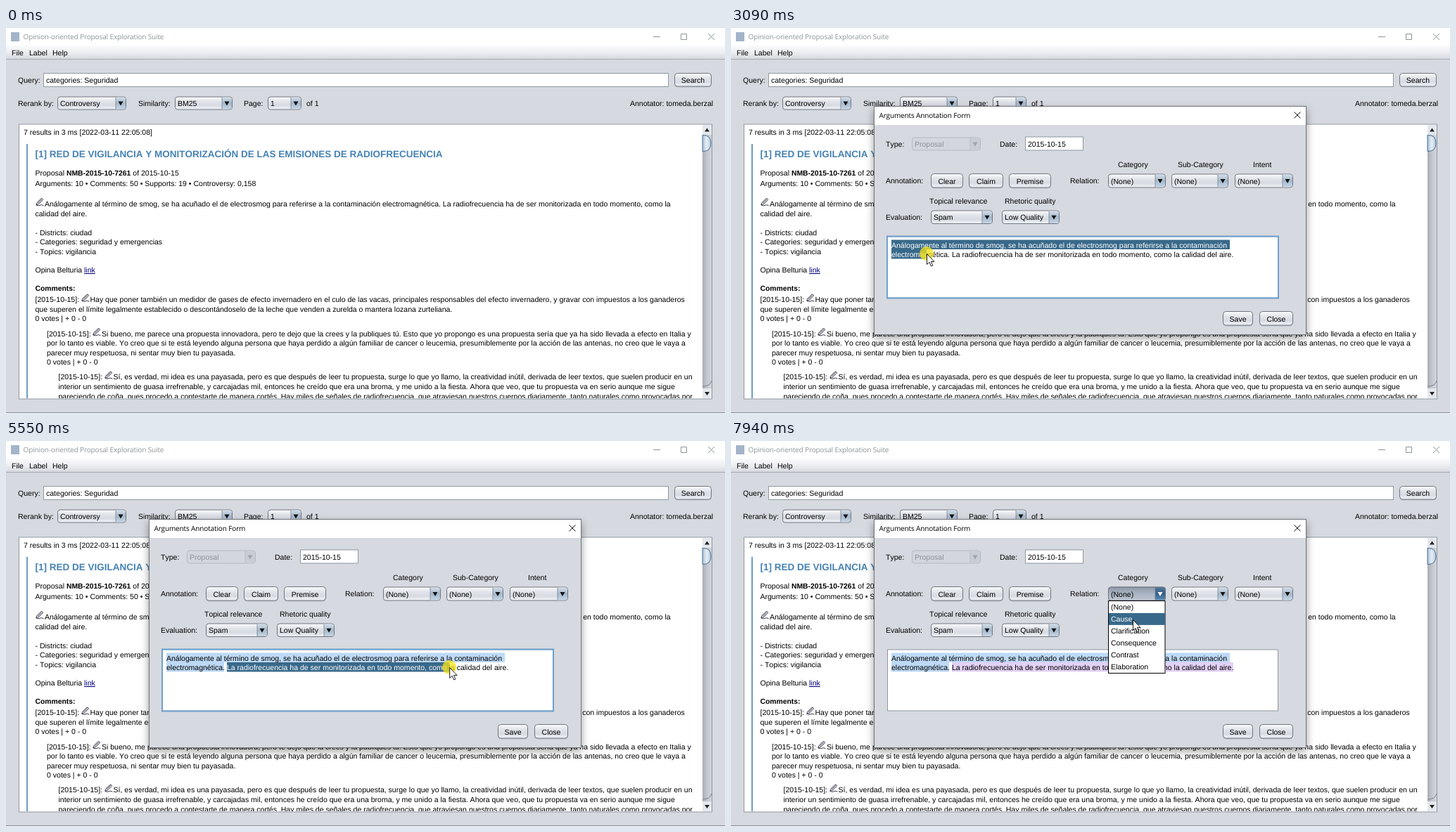
An HTML page for the animation above (8000 ms loop, 1022 by 548 pixels).

```html
<!DOCTYPE html>
<html lang="es">
<head>
<meta charset="utf-8">
<title>Annotation demo</title>
<style>
html, body { margin: 0; width: 100%; height: 100%; overflow: hidden; background: #d6d9df; }
svg { display: block; }
text { font: 10.52px "Liberation Sans", Arial, sans-serif; font-kerning: none; text-rendering: geometricPrecision; fill: #000; }
.bold { font-weight: bold; font-size: 10.35px; }
.head { font-weight: bold; font-size: 13.5px; fill: #4682b4; }
.win { font: 10px "Open Sans", "Noto Sans", sans-serif; letter-spacing: -.13px; }
.link { fill: #000080; text-decoration: underline; }
.off { fill: #8e9196; }
.inv { fill: #fff; }
.mid { text-anchor: middle; }
</style>
</head>
<body>
<svg id="stage" width="1022" height="548" viewBox="0 0 1022 548"></svg>
<script>
const LOOP = 8000;
const pct = ms => +(ms / LOOP * 100).toFixed(4) + '%';

// Visible spans in ms: from, to, from, to ...
const spans = {
  active: [1040, 1220],
  dialog: [1220, LOOP],
  dateFocus: [1220, 2770],
  areaFocus: [2770, 4170, 5280, 6840],
  clearHover: [1640, 1680],
  spamHover: [1730, 1790],
  claimHover: [4060, 4390],
  claimPress: [4170, 4260],
  claimFocus: [4170, 5280],
  premiseHover: [6440, 7230],
  premisePress: [6840, 6900],
  premiseFocus: [6840, 7560],
  pickA: [2770, 4260],
  pickB: [5280, 6900],
  markA: [4260, LOOP],
  markB: [6900, LOOP],
  list: [7560, LOOP],
  rowNone: [7560, 7870],
  rowCause: [7870, LOOP],
  glow: [1040, 1220, 2770, 3330, 4170, 4260, 5280, 5920, 6840, 6900, 7560, 7620],
  arrow: [40, 890, 1220, LOOP],
  hand: [890, 1220]
};

// Pointer stops: ms, x, y, easing towards the next stop
const path = [
  [0, 915, 527], [40, 915, 527, 'cubic-bezier(.35,.1,.4,1)'], [830, 50, 257], [860, 50, 256], [980, 50, 250],
  [1530, 50, 250, 'ease-in'], [1660, 300, 224], [1740, 304, 262], [1800, 282, 267],
  [1830, 282, 267, 'ease-out'], [2310, 237, 310], [2400, 237, 310], [2620, 231, 310],
  [2770, 231, 310], [3090, 278, 321], [3120, 278, 321], [3330, 311, 325],
  [3760, 311, 325, 'ease-in-out'], [4080, 356, 222], [4350, 356, 222], [4540, 351, 269, 'ease-out'],
  [4840, 317, 327], [4910, 316, 327], [5090, 315, 326], [5280, 315, 326, 'ease-in-out'],
  [5670, 706, 321], [5860, 706, 321], [5920, 718, 321], [6160, 718, 321, 'ease-in-out'],
  [6530, 452, 217], [7210, 452, 217, 'ease-in-out'], [7500, 577, 218], [7660, 577, 218, 'ease-in-out'],
  [7940, 571, 254], [LOOP, 571, 254]
];

// Selection widths: ms, px, easing
const widths = {
  growA1: [[0, 0], [2770, 0], [2929, 26], [2930, 481], [LOOP, 481]],
  growA2: [[0, 0], [2929, 0], [2930, 26], [3090, 50], [3120, 50], [3330, 82], [LOOP, 82]],
  growB: [[0, 0], [5280, 0, 'ease-in-out'], [5670, 392], [5860, 392], [5920, 400], [LOOP, 400]]
};

function buildCss() {
  let css = '';
  const rule = (name, body, ease) =>
    css += `@keyframes ${name}{${body}}.${name}{animation:${name} ${LOOP}ms ${ease} infinite}\n`;
  for (const [name, times] of Object.entries(spans)) {
    const steps = times.map((ms, i) => `${pct(ms)}{visibility:${i % 2 ? 'hidden' : 'visible'}}`);
    rule(name, '0%{visibility:hidden}' + steps.join(''), 'step-end');
  }
  const key = (ms, prop, ease = 'linear') => `${pct(ms)}{${prop};animation-timing-function:${ease}}`;
  for (const [name, keys] of Object.entries(widths))
    rule(name, keys.map(([ms, w, ease]) => key(ms, `width:${w}px`, ease)).join(''), 'linear');
  rule('pointer', path.map(([ms, x, y, ease]) => key(ms, `transform:translate(${x}px,${y}px)`, ease)).join(''), 'linear');
  return css;
}

const text = (x, y, s, cls = '') => `<text x="${x}" y="${y}" class="${cls}">${s}</text>`;
const rect = (x, y, w, h, fill, more = '') => `<rect x="${x}" y="${y}" width="${w}" height="${h}" fill="${fill}" ${more}/>`;
const line = (d, color, w = 1) => `<path d="${d}" fill="none" stroke="${color}" stroke-width="${w}"/>`;
const group = (cls, ...parts) => `<g class="${cls}">${parts.join('')}</g>`;
const grad = (id, stops, horizontal) =>
  `<linearGradient id="${id}" x2="${horizontal ? 1 : 0}" y2="${horizontal ? 0 : 1}">` +
  stops.map((c, i) => `<stop offset="${i / (stops.length - 1)}" stop-color="${c}"/>`).join('') + '</linearGradient>';
const ring = (x, y, w, h, cls, r = 0) =>
  rect(x - .5, y - .5, w + 1, h + 1, 'none', `rx="${r}" stroke="#6fa1cf" stroke-width="2" class="${cls}"`);
const field = (x, y, w, h) => rect(x + .5, y + .5, w - 1, h - 1, '#fff', 'stroke="#9197a2"');

function button(x, y, w, h, label, id) {
  const box = (fill, cls = '') => rect(x + .5, y + .5, w - 1, h - 1.5, fill, `rx="4" stroke="#70757f" class="${cls}"`);
  let out = rect(x + .5, y + 1.5, w - 1, h - 1, '#b9bdc6', 'rx="4"') + box('url(#face)');
  if (id) out += box('url(#lit)', id + 'Hover');
  if (id && id !== 'clear') out += box('url(#down)', id + 'Press') + ring(x, y, w, h - .5, id + 'Focus', 4.5);
  return out + text(x + w / 2, y + h / 2 + 4, label, 'mid');
}

function combo(x, y, w, h, label, look = '') {
  const off = look === 'off', open = look === 'open', ax = x + w - 15;
  const edge = off ? '#b4b8c0' : '#70757f';
  const face = off ? '#d3d6dc' : open ? 'url(#down)' : look === 'lit' ? 'url(#lit)' : 'url(#face)';
  const tip = off ? '#c9cdd5' : open ? 'url(#deep)' : 'url(#blue)';
  const ay = y + h / 2 - 2.5;
  return rect(x + .5, y + .5, w - 1, h - 1, face, `rx="3.5" stroke="${edge}"`) +
    `<path d="M${ax} ${y + 1}H${x + w - 4}q3 0 3 3V${y + h - 4}q0 3-3 3H${ax}Z" fill="${tip}"/>` +
    line(`M${ax} ${y + 1}v${h - 2}`, edge, .7) +
    `<path d="M${ax + 3.5} ${ay}h7l-3.5 6z" fill="${off ? '#9fa4ad' : open ? '#fff' : '#111'}"/>` +
    text(x + 4, y + h / 2 + 4, label, off ? 'off' : '');
}

const pen = (x, y) => `<g transform="translate(${x} ${y})">` +
  line('M.8 9.8L1.8 6.7L8 .8Q10 .2 10.5 2.6L4.2 8.8ZM3 7.6L8.6 2.2M.8 9.8Q4 11.8 6.2 10.3T11.5 10.8', '#1d1d33', .9) + '</g>';

const cross = (x, y, color) => line(`M${x} ${y}l9 9m0-9l-9 9`, color);

const titleBar = color => rect(0, 0, 1022, 25, '#fff') + rect(7, 6, 12, 13, '#a3b4ca') +
  `<text x="24.5" y="16" class="win" style="fill:${color}">Opinion-oriented Proposal Exploration Suite</text>` +
  line('M920 12.5h10M959.5 8.5h8v8h-8z', color) + cross(998, 8, color);

function results() {
  return [
    text(25, 152, '7 results in 3 ms [2022-03-11 22:05:08]'),
    rect(29, 165, 2, 362, '#6d9cc6'),
    text(41.5, 184.3, '[1] RED DE VIGILANCIA Y MONITORIZACIÓN DE LAS EMISIONES DE RADIOFRECUENCIA', 'head'),
    text(41.5, 209.6, 'Proposal <tspan class="bold">NMB-2015-10-7261</tspan> of 2015-10-15'),
    text(41.5, 224.6, 'Arguments: 10 • Comments: 50 • Supports: 19 • Controversy: 0,158'),
    pen(42, 242),
    text(55, 254, 'Análogamente al término de smog, se ha acuñado el de electrosmog para referirse a la contaminación electromagnética. La radiofrecuencia ha de ser monitorizada en todo momento, como la'),
    text(41.5, 267.5, 'calidad del aire.'),
    text(41.5, 294.5, '- Districts: ciudad'),
    text(41.5, 308, '- Categories: seguridad y emergencias'),
    text(41.5, 321.5, '- Topics: vigilancia'),
    text(41.5, 348, 'Opina Belturia'),
    text(111, 348, 'link', 'link'),
    text(41.5, 374, 'Comments:', 'bold'),
    text(41.5, 390.3, '[2015-10-15]:'), pen(107, 378.5),
    text(119.5, 390.3, 'Hay que poner también un medidor de gases de efecto invernadero en el culo de las vacas, principales responsables del efecto invernadero, y gravar con impuestos a los ganaderos'),
    text(41.5, 403.8, 'que superen el límite legalmente establecido o descontándoselo de la leche que venden a zurelda o mantera lozana zurteliana.'),
    text(41.5, 417.3, '0 votes | + 0 - 0'),
    text(58, 438.7, '[2015-10-15]:'), pen(123, 427),
    text(136, 438.7, 'Si bueno, me parece una propuesta innovadora, pero te dejo que la crees y la publiques tú. Esto que yo propongo es una propuesta sería que ya ha sido llevada a efecto en Italia y'),
    text(58, 452.3, 'por lo tanto es viable. Yo creo que si te está leyendo alguna persona que haya perdido a algún familiar de cancer o leucemia, presumiblemente por la acción de las antenas, no creo que le vaya a'),
    text(58, 465.8, 'parecer muy respetuosa, ni sentar muy bien tu payasada.'),
    text(58, 479.3, '0 votes | + 0 - 0'),
    text(74.5, 500.3, '[2015-10-15]:'), pen(140, 488.5),
    text(152.5, 500.3, 'Sí, es verdad, mi idea es una payasada, pero es que después de leer tu propuesta, surge lo que yo llamo, la creatividad inútil, derivada de leer textos, que suelen producir en un'),
    text(74.5, 513.8, 'interior un sentimiento de guasa irrefrenable, y carcajadas mil, entonces he creído que era una broma, y me unido a la fiesta. Ahora que veo, que tu propuesta va en serio aunque me sigue'),
    text(74.5, 527.5, 'pareciendo de coña, pues procedo a contestarte de manera cortés. Hay miles de señales de radiofrecuencia, que atraviesan nuestros cuerpos diariamente, tanto naturales como provocadas por')
  ].join('');
}

const scrollBar = () => rect(990, 138, 13, 389, 'url(#track)') +
  rect(990, 138, 13, 14, '#e4e7ec') + rect(990, 513, 13, 14, '#e4e7ec') +
  line('M990 510Q1001 510 1003 502', '#7d828c') +
  '<path d="M990 152.5Q1002 152 1002 164T990 175.5Z" fill="url(#thumb)" stroke="#4a6d90"/>' +
  '<path d="M993 147.500h7l-3.500-5zM993 518h7l-3.500 5z" fill="#222"/>';

const mainWindow = () => [
  rect(0, 0, 1022, 548, '#d6d9df'),
  titleBar('#8b9595'), group('active', titleBar('#000')),
  rect(0, 25, 1022, 20, 'url(#menu)'), rect(0, 44, 1022, 1, '#a5a9b2'),
  text(8, 39, 'File'), text(33, 39, 'Label'), text(66, 39, 'Help'),
  text(17, 78, 'Query:'), field(53, 64, 889, 20), text(57, 78, 'categories: Seguridad'),
  button(950, 64, 53, 20, 'Search'),
  text(17, 111, 'Rerank by:'), combo(73, 97.5, 98, 19, 'Controversy'),
  text(188, 111, 'Similarity:'), combo(240, 97.5, 82, 19, 'BM25'),
  text(338, 111, 'Page:'), combo(372, 97.5, 48, 19, '1'), text(427, 111, 'of 1'),
  text(887, 111, 'Annotator: tomeda.berzal'),
  field(18, 136.5, 986, 392),
  `<g clip-path="url(#pane)">${results()}</g>`, scrollBar(),
  ring(19, 137.5, 984, 390, 'active'),
  rect(0, 547, 1022, 1, '#8b8f97')
].join('');

const quote = cls => text(228, 312.6, 'Análogamente al término de smog, se ha acuñado el de electrosmog para referirse a la contaminación', cls) +
  text(228, 326.1, 'electromagnética. La radiofrecuencia ha de ser monitorizada en todo momento, como la calidad del aire.', cls);
const picked = (id, clip) =>
  `<g class="${id}"><g clip-path="url(#${clip})">${rect(222, 298, 555, 40, '#39698a')}${quote('inv')}</g></g>`;

function dropDown() {
  const rows = ['(None)', 'Cause', 'Clarification', 'Consequence', 'Contrast', 'Elaboration'];
  const y = i => 240.4 + i * 16.9;
  const lit = (i, cls) => group(cls, rect(537, y(i) - 12.4, 80, 17, '#39698a'), text(540, y(i), rows[i], 'inv'));
  return group('list', combo(536, 207.5, 82, 20, '(None)', 'open'),
    rect(536.5, 227.5, 80.5, 103, '#fff', 'stroke="#000"'),
    ...rows.map((s, i) => text(540, y(i), s)), lit(0, 'rowNone'), lit(1, 'rowCause'));
}

const dialog = () => group('dialog',
  rect(203, 112, 615, 325, '#d6d9df', 'filter="url(#shade)"'),
  rect(203.5, 111.5, 614, 325, '#d6d9df', 'stroke="#6f7379"'),
  rect(204, 112, 613, 26, '#fff'),
  text(210.5, 128.3, 'Arguments Annotation Form', 'win'), cross(800.5, 119.5, '#111'),
  text(220, 169, 'Type:'), combo(257, 155.5, 98, 19, 'Proposal', 'off'),
  text(382, 169, 'Date:'), field(418, 154.5, 83, 20), ring(419, 155.5, 81, 18, 'dateFocus'), text(422, 168.7, '2015-10-15'),
  text(550, 198, 'Category'), text(635, 198, 'Sub-Category'), text(742, 198, 'Intent'),
  text(220, 221.4, 'Annotation:'),
  button(284, 207, 46, 21, 'Clear', 'clear'), button(338, 207, 49, 21, 'Claim', 'claim'),
  button(395, 207, 60, 21, 'Premise', 'premise'),
  text(482, 221.4, 'Relation:'),
  combo(536, 207.5, 82, 20, '(None)'), combo(626, 207.5, 81, 20, '(None)'), combo(716, 207.5, 83, 20, '(None)'),
  text(282, 250.3, 'Topical relevance'), text(389, 250.3, 'Rhetoric quality'),
  text(220, 273.3, 'Evaluation:'),
  combo(284, 259.5, 88, 19.5, 'Spam'), group('spamHover', combo(284, 259.5, 88, 19.5, 'Spam', 'lit')),
  combo(385, 259.5, 82, 19.5, 'Low Quality'),
  field(222, 296.5, 556, 88),
  group('markA', rect(228, 301.5, 481, 13.5, '#bdd9f5'), rect(228, 315, 82, 13.5, '#bdd9f5')),
  group('markB', rect(314, 315, 400, 13.5, '#e3d1f5')),
  quote(''), picked('pickA', 'clipA'), picked('pickB', 'clipB'),
  ring(222.5, 297, 555, 87, 'areaFocus'),
  button(699, 403, 43, 21, 'Save'), button(751, 403, 48, 21, 'Close'),
  dropDown());

const pointer = () => group('pointer',
  '<circle r="10" fill="#f4e21c" opacity=".78" class="glow"/>',
  '<path class="arrow" d="M.5 .5V15.500L4 12.300L6.500 18L8.800 17L6.400 11.500H11Z" fill="#fff" stroke="#000" stroke-width=".9"/>',
  '<path class="hand" d="M-1.500 12V1.500Q0 -.5 1.500 1.500V7Q3 5.500 4.500 7.200Q6 6.200 7.200 7.800Q9.500 7.200 9.500 9.500V13Q9.500 16 7.500 18.500H0L-5 11.500Q-4.500 9-1.500 12Z" fill="#fff" stroke="#000"/>' );

const defs = '<defs>' +
  grad('face', ['#fcfcfd', '#e2e5ea', '#d7dae1', '#f3f5f8']) +
  grad('lit', ['#fff', '#f2f4f7', '#e9ecf1', '#fff']) +
  grad('down', ['#8e99a8', '#a9b4c2', '#bcc6d2']) +
  grad('blue', ['#d3dde8', '#a5b9cd', '#c5d5e4']) +
  grad('deep', ['#4d7699', '#33618a', '#5c8bb3']) +
  grad('menu', ['#fafbfc', '#eceef1', '#d3d6dc']) +
  grad('track', ['#a9adb6', '#c3c7cf', '#d2d5db'], true) +
  grad('thumb', ['#a9c0d6', '#e6eef5', '#b4cadf'], true) +
  `<clipPath id="pane">${rect(19, 138, 970, 389, '#000')}</clipPath>` +
  `<clipPath id="clipA">${rect(228, 301.5, 0, 13.5, '#000', 'class="growA1"')}${rect(228, 315, 0, 13.5, '#000', 'class="growA2"')}</clipPath>` +
  `<clipPath id="clipB">${rect(314, 315, 0, 13.5, '#000', 'class="growB"')}</clipPath>` +
  '<filter id="shade" x="-5%" y="-8%" width="110%" height="120%"><feDropShadow dx="0" dy="4" stdDeviation="6" flood-opacity=".4"/></filter></defs>';

document.head.appendChild(document.createElement('style')).textContent = buildCss();
document.getElementById('stage').innerHTML = defs + mainWindow() + dialog() + pointer();
</script>
</body>
</html>
```
